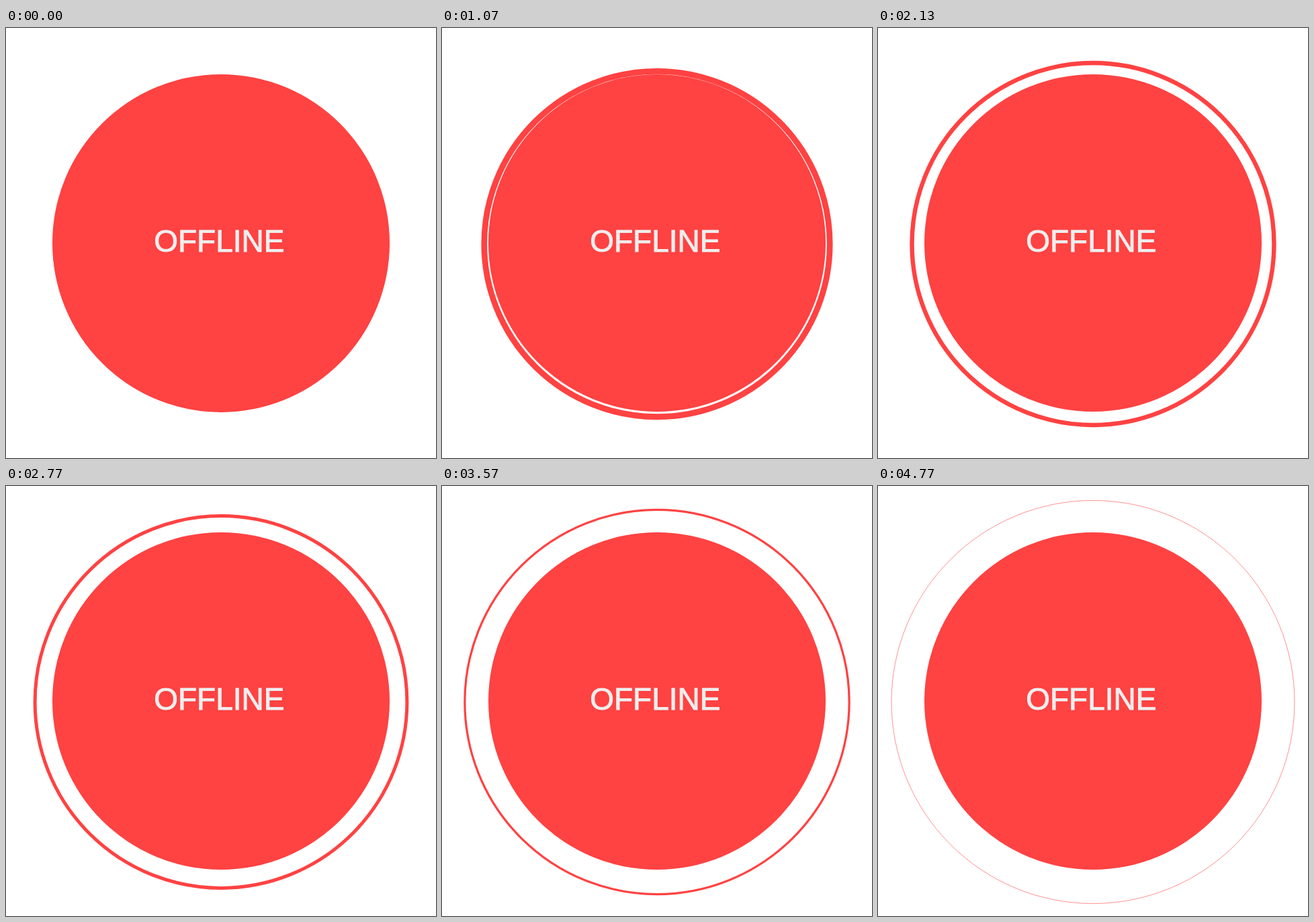
Animation of 640x640 px, one loop 4810 ms. Source, as an HTML page:

```html
<!DOCTYPE html>
<html lang="en">
<head>
<meta charset="utf-8">
<title>Offline pulse</title>
<style>
  html, body { margin: 0; width: 100%; height: 100%; overflow: hidden; background: #fff; }
  svg { display: block; width: 100%; height: 100%; }
  .disc { fill: #ff4242; }
  .ring {
    fill: none;
    stroke: #ff4242;
    animation: pulse 4810ms linear infinite;
  }
  text {
    font: 46px "Liberation Sans", Arial, sans-serif;
    fill: #eee;
    stroke: #eee;
    stroke-width: 1px;
  }
  @keyframes pulse {
    from { r: 244.85px; stroke-width: 11.1px; }
    to   { r: 300.45px; stroke-width: 0.5px; }
  }
</style>
</head>
<body>
<svg viewBox="0 0 640 640">
  <circle class="ring" cx="320" cy="321.5" r="244.85"/>
  <circle class="disc" cx="320" cy="320" r="251"/>
  <text x="220.2" y="333.2">OFFLINE</text>
</svg>
</body>
</html>
```
